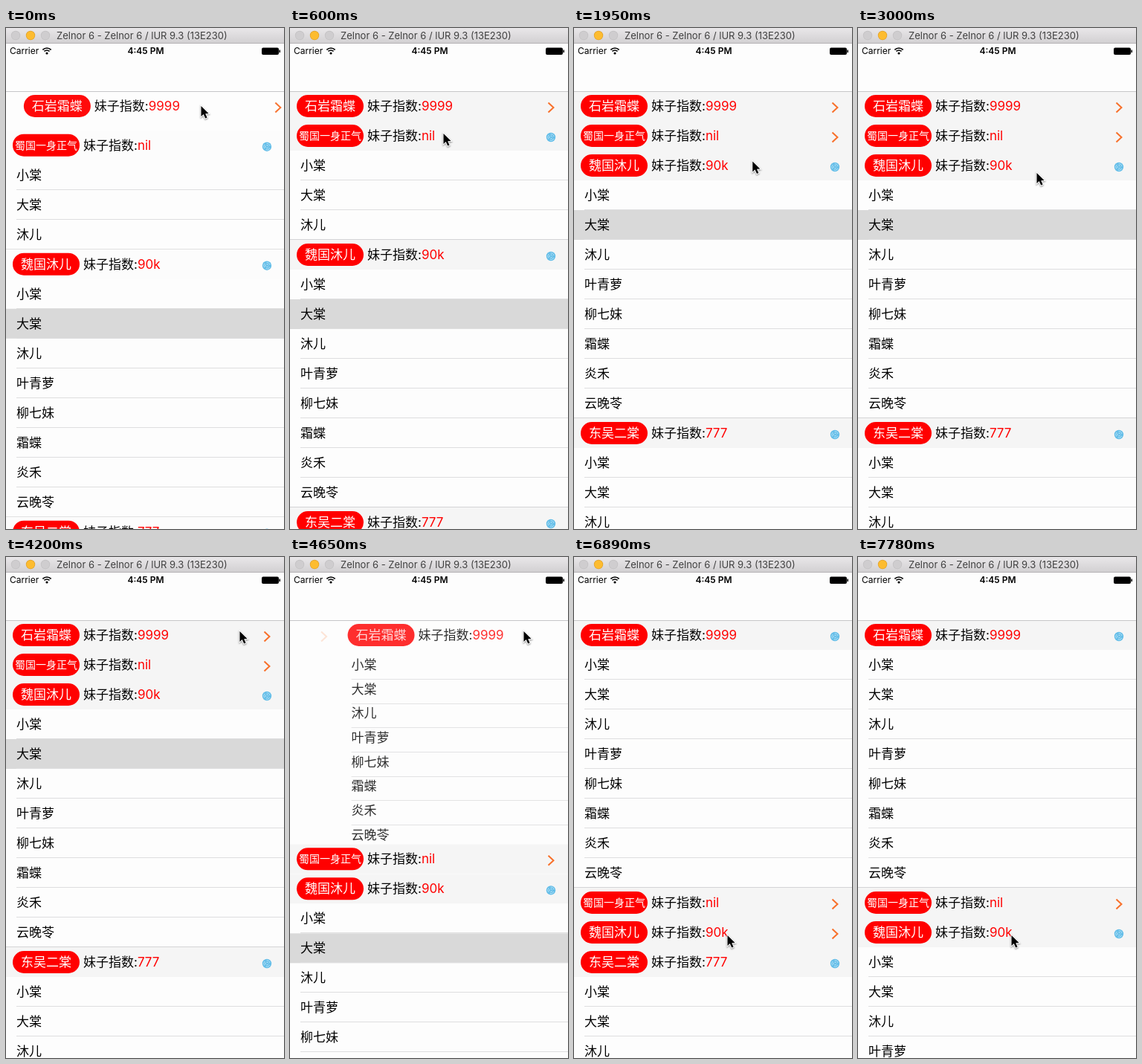
These frames come from a looping animation (374x674 px, 8 s). An HTML page with a canvas:

```html
<!DOCTYPE html>
<html lang="zh">
<head>
<meta charset="utf-8">
<style>
html, body { margin: 0; width: 100%; height: 100%; overflow: hidden; background: #fdfdfd; }
canvas { display: block; width: 374px; height: 674px; }
</style>
</head>
<body>
<canvas id="stage"></canvas>
<script>
const W = 374, H = 674, TOP = 85, ROW = 40, LOOP = 8000, SLIDE = 300;
const canvas = document.getElementById('stage');
const ctx = canvas.getContext('2d');
const dpr = window.devicePixelRatio || 1;
canvas.width = W * dpr;
canvas.height = H * dpr;

const names = ['小棠', '大棠', '沐儿', '叶青萝', '柳七妹', '霜蝶', '炎禾', '云晚苓'];
// toggles: [start time, opens]; every section is open before its first toggle
const sections = [
  { title: '石岩霜蝶', value: '9999', rows: 8, toggles: [[-264, false], [4432, true]] },
  { title: '蜀国一身正气', value: 'nil', rows: 3, toggles: [[966, false]] },
  { title: '魏国沐儿', value: '90k', rows: 8, toggles: [[6515, false], [7405, true]] },
  { title: '东吴二棠', value: '777', rows: 8, toggles: [] }
];
const pointerPath = [
  [0, 262, 104], [600, 206, 141], [1500, 206, 141], [2100, 251, 191],
  [2550, 215, 196], [3000, 240, 194], [3600, 240, 194], [4200, 314, 99],
  [4650, 314, 99], [5400, 197, 447], [6290, 206, 508], [LOOP, 206, 508]
];

function rect(x, y, w, h, color) {
  ctx.fillStyle = color;
  ctx.fillRect(x, y, w, h);
}

function text(str, x, y, size, color, align = 'left', weight = 400) {
  ctx.font = `${weight} ${size}px Inter, "Noto Sans CJK SC", "Noto Sans CJK", sans-serif`;
  ctx.textAlign = align;
  ctx.fillStyle = color;
  ctx.fillText(str, x, Math.round(y + size * 0.36));
  return ctx.measureText(str).width;
}

function disc(x, y, r, color) {
  ctx.fillStyle = color;
  ctx.beginPath();
  ctx.arc(x, y, r, 0, 7);
  ctx.fill();
}

function line(points, color, width) {
  ctx.strokeStyle = color;
  ctx.lineWidth = width;
  ctx.beginPath();
  points.forEach(([x, y]) => ctx.lineTo(x, y));
  ctx.stroke();
}

function openIcon(x, y) {
  disc(x, y, 6.2, '#62bde8');
  ctx.strokeStyle = '#d3eefa';
  ctx.lineWidth = 0.8;
  for (const r of [2, 4.2]) {
    for (const a of [0.4, 2.5, 4.6]) {
      ctx.beginPath();
      ctx.arc(x, y, r, a + r, a + r + 1.5);
      ctx.stroke();
    }
  }
}

function header(section, y, open) {
  const mid = y + 20;
  ctx.fillStyle = '#f00';
  ctx.beginPath();
  ctx.roundRect(9, y + 5, 90, 30, 15);
  ctx.fill();
  text(section.title, 54, mid, section.title.length > 4 ? 14 : 17, '#fff', 'center');
  const w = text('妹子指数:', 104, mid, 17, '#000');
  text(section.value, 104 + w, mid, 17, '#f00');
  if (open) openIcon(351, mid + 2);
  else line([[347.5, mid - 4.5], [354.5, mid + 2], [347.5, mid + 8.5]], '#f8702a', 2);
}

function rows(index, y, spread, t) {
  const count = sections[index].rows;
  for (let i = 0; i < count; i++) {
    const top = y + ROW + i * ROW * spread;
    if (index === 2 && i === 1 && t < 7000) rect(0, top, W, ROW, '#d9d9d9');
    const last = i === count - 1;
    if (!last) rect(14, Math.round(top) + 39, W, 1, '#dededf');
    else if (index !== 0 || t >= 6515) rect(0, Math.round(top) + 39, W, 1, '#d4d4d6');
    text(names[i], 14, top + 20, 17, '#000');
  }
}

function page(index, y, open, spread, shift, alpha, t) {
  ctx.save();
  ctx.globalAlpha = alpha;
  ctx.translate(shift, 0);
  if (open) rows(index, y, spread, t);
  header(sections[index], y, open);
  ctx.restore();
}

// Open state of a section and the share of its slide still to go
function stateAt(section, t) {
  const toggle = section.toggles.filter(([start]) => start <= t).pop();
  if (!toggle) return { open: true, left: 0 };
  const p = Math.min(1, (t - toggle[0]) / SLIDE);
  return { open: toggle[1], left: 1 - p * p * (3 - 2 * p) };
}

function list(t) {
  let y = TOP;
  sections.forEach((section, i) => {
    const { open, left } = stateAt(section, t);
    const spread = open ? 1 - left : left;
    const height = ROW + section.rows * ROW * spread;
    ctx.save();
    ctx.beginPath();
    ctx.rect(0, y, W, height);
    ctx.clip();
    if (left) page(i, y, !open, spread, (left - 1) * W, left, t);
    else rect(0, y, W, ROW, t < 150 ? '#fcfcfc' : '#f5f5f5');
    page(i, y, open, spread, left * W, 1 - left, t);
    ctx.restore();
    y += height;
  });
}

function chrome() {
  const bar = ctx.createLinearGradient(0, 0, 0, 21);
  bar.addColorStop(0, '#e9e7e9');
  bar.addColorStop(1, '#d1cfd1');
  rect(0, 0, W, 20, bar);
  rect(0, 20, W, 1, '#b4b2b4');
  [[13, '#c2c0c2'], [33, '#e0a028'], [53, '#c2c0c2']].forEach(([x, edge]) => {
    disc(x, 10, 6.2, edge);
    disc(x, 10, 5.5, x === 33 ? '#fdbc30' : '#cfcdcf');
  });
  text('Zelnor 6 - Zelnor 6 / lUR 9.3 (13E230)', 68, 10, 13, '#404040');

  text('Carrier', 5, 31, 12, '#000');
  ctx.strokeStyle = '#000';
  ctx.lineWidth = 1.7;
  for (const r of [8, 5]) {
    ctx.beginPath();
    ctx.arc(55, 35, r, -Math.PI * 0.75, -Math.PI * 0.25);
    ctx.stroke();
  }
  disc(55, 34, 1.6, '#000');
  text('4:45 PM', 188, 31, 12, '#000', 'center', 600);
  ctx.fillStyle = '#000';
  ctx.beginPath();
  ctx.roundRect(344, 26.5, 23, 9.5, 2);
  ctx.fill();
  rect(367.5, 29.5, 1.5, 3.5, '#000');
  rect(0, TOP, W, 1, '#c6c6c8');
}

function pointer(t) {
  const n = pointerPath.findIndex(([time]) => time > t);
  const [t0, x0, y0] = pointerPath[n - 1], [t1, x1, y1] = pointerPath[n];
  const p = (t - t0) / (t1 - t0);
  ctx.save();
  ctx.translate(x0 + (x1 - x0) * p, y0 + (y1 - y0) * p);
  ctx.beginPath();
  [[0.5, 1], [0.5, 15], [3.7, 12], [6.2, 17.6], [8.6, 16.5], [6.2, 11.2], [10.6, 11]]
    .forEach(([x, y]) => ctx.lineTo(x, y));
  ctx.closePath();
  ctx.lineWidth = 2;
  ctx.strokeStyle = '#fff';
  ctx.shadowColor = 'rgba(0,0,0,.45)';
  ctx.shadowBlur = 2 * dpr;
  ctx.shadowOffsetY = dpr;
  ctx.stroke();
  ctx.shadowColor = 'transparent';
  ctx.fillStyle = '#000';
  ctx.fill();
  ctx.restore();
}

// The picture advances in steps of about 150 ms
function stepTime(t) {
  const lag = t < 5900 ? 0 : t < 7400 ? 10 : 20;
  return Math.floor((t + lag) / 150) * 150 - lag;
}

const began = performance.now();
function draw() {
  const t = stepTime((performance.now() - began) % LOOP);
  ctx.setTransform(dpr, 0, 0, dpr, 0, 0);
  rect(0, 0, W, H, '#fdfdfd');
  list(t);
  chrome();
  pointer(t);
  requestAnimationFrame(draw);
}
draw();
</script>
</body>
</html>
```
